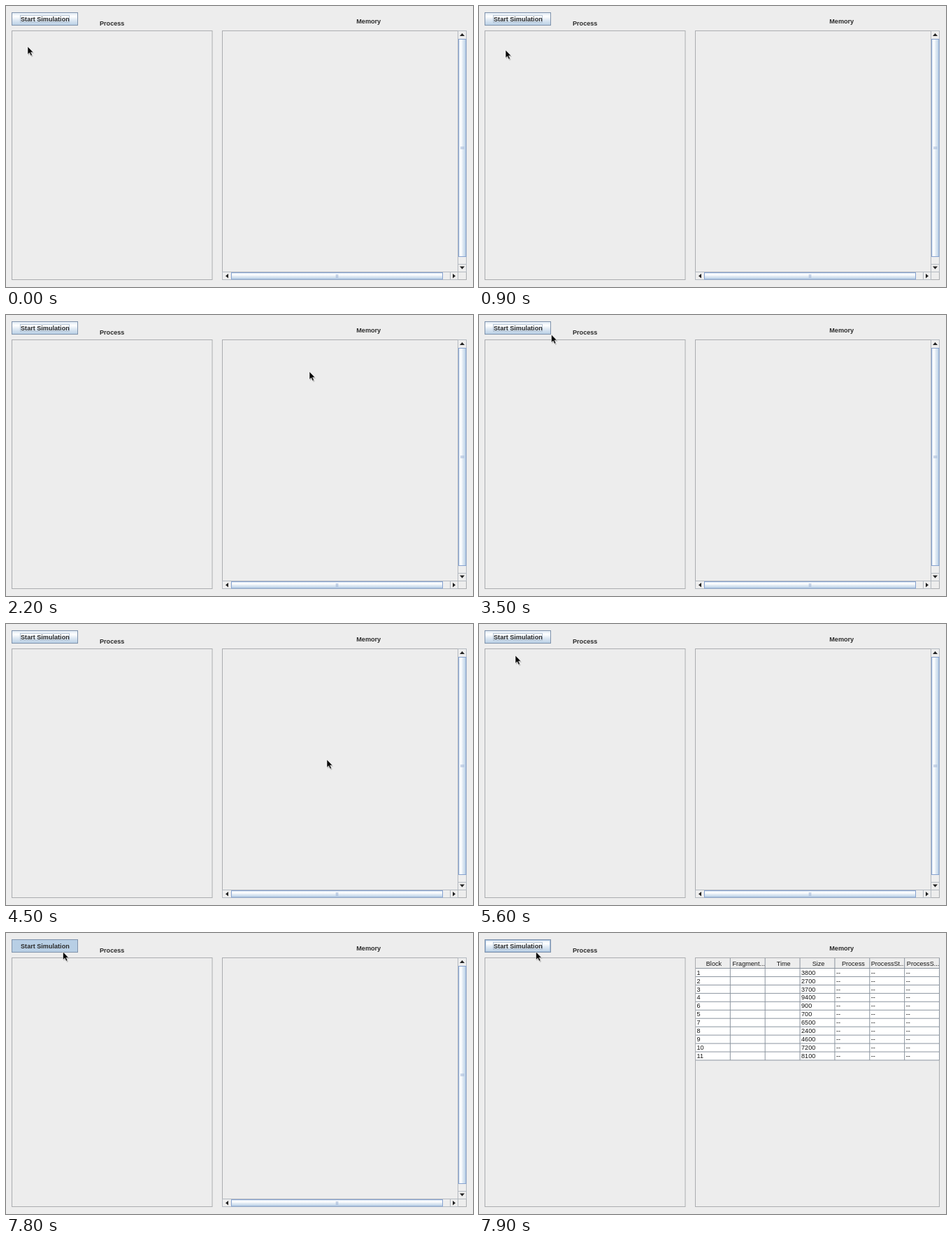
An HTML page for the animation above (8000 ms loop, 668 px wide and 402 px high).

```html
<!DOCTYPE html>
<html lang="en">
<head>
<meta charset="utf-8">
<title>Memory simulation</title>
<style>
  html, body { margin: 0; width: 100%; height: 100%; overflow: hidden; background: #ededed; }
  svg { display: block; }
  text { font: 9.1px "Liberation Sans", Arial, sans-serif; fill: #151515; }
  .bold { font-weight: bold; fill: #2b2b2b; }
  .mid { text-anchor: middle; }
  .panel { fill: none; stroke: #abadb0; }
  .track { fill: #eee; stroke: #b3b9c0; }
  .thumb { stroke: #86a2d0; }
  .grip { stroke: #9fb4d6; }
  .grid { stroke: #8b949f; }
</style>
</head>
<body>
<svg width="668" height="402" viewBox="0 0 668 402">
  <defs>
    <linearGradient id="down" x2="0" y2="1">
      <stop stop-color="#dde8f3"/><stop offset=".3" stop-color="#fff"/>
      <stop offset=".6" stop-color="#dde8f3"/><stop offset="1" stop-color="#b8cfe5"/>
    </linearGradient>
    <linearGradient id="across" href="#down" x2="1" y2="0"/>
  </defs>

  <rect id="button" x="8.5" y="9.5" width="94" height="18" fill="url(#down)" stroke="#7f92ab"/>
  <rect id="hover" x="9.5" y="10.5" width="92" height="16" fill="none" stroke="#a3bddb"/>
  <rect id="focus" x="20.5" y="13.5" width="70" height="10" fill="none" stroke="#a8bace" stroke-width=".8"/>
  <text class="bold mid" x="55.9" y="22.3">Start Simulation</text>
  <text class="bold mid" x="151.7" y="28.4">Process</text>
  <text class="bold mid" x="518.7" y="25.4">Memory</text>

  <rect class="panel" x="8.5" y="35.5" width="286.5" height="356"/>
  <rect class="panel" x="309.5" y="35.5" width="349" height="356"/>

  <g id="bars">
    <rect class="track" x="646.5" y="35.5" width="12" height="345"/>
    <rect class="track" x="309.5" y="380.5" width="337" height="11"/>
    <path class="track" d="M647 369.5h11M635.5 381v10"/>
    <rect class="thumb" x="647.5" y="47.5" width="10.5" height="311" fill="url(#across)"/>
    <rect class="thumb" x="322.5" y="381.5" width="302" height="9.5" fill="url(#down)"/>
    <path class="grip" d="M650 202h5.500m-5.500 2h5.500M472.500 384v5m2-5v5"/>
    <path fill="#222" d="M649 43l3.500-4 3.500 4zM649 372.500l3.500 4 3.500-4zM318 383l-4 3.300 4 3.300zM639 383l4 3.300-4 3.300z"/>
  </g>
  <g id="table"></g>

  <g id="cursor">
    <path d="M1 1.500V13L3.700 10.600 5.600 15 7.700 14 5.800 9.800H9.300Z" opacity=".18"/>
    <path d="M0 0V11.300L2.600 8.900 4.500 13.200 6.500 12.300 4.600 8.200H8Z" fill="#080808" stroke="#fff" stroke-width=".7" stroke-opacity=".8"/>
  </g>
</svg>
<script>
const $ = id => document.getElementById(id);
const show = (id, on) => $(id).setAttribute('visibility', on ? 'visible' : 'hidden');

const LOOP = 8000, TICK = 100, HOVER = 5900, PRESS = 7800, RELEASE = 7900;

// The pointer glides to each stop in a number of equal ticks and rests there.
const home = { x: 31, y: 58 };
const glides = [
  { end: 200, ticks: 1, x: 38, y: 63 },
  { end: 1500, ticks: 3, x: 262, y: 149 },
  { end: 2200, ticks: 3, x: 434, y: 81 },
  { end: 2900, ticks: 1, x: 450, y: 106 },
  { end: 3500, ticks: 3, x: 103.5, y: 28 },
  { end: 3900, ticks: 1, x: 428, y: 175 },
  { end: 4400, ticks: 3, x: 459, y: 194 },
  { end: 4700, ticks: 1, x: 223, y: 116 },
  { end: 5600, ticks: 3, x: 52, y: 45 },
  { end: 6200, ticks: 6, x: 78, y: 27 },
  { end: 6600, ticks: 1, x: 81.5, y: 27 }
];

function pointerAt(t) {
  const now = Math.floor(t / TICK) * TICK;
  let { x, y } = home;
  for (const glide of glides) {
    const part = Math.min(1, 1 + (now - glide.end) / (glide.ticks * TICK));
    if (part <= 0) break;
    x += (glide.x - x) * part;
    y += (glide.y - y) * part;
  }
  return `translate(${x} ${y})`;
}

function buildTable() {
  const heads = 'Block,Fragment...,Time,Size,Process,ProcessSt...,ProcessS...'.split(',');
  const blocks = [1, 2, 3, 4, 6, 5, 7, 8, 9, 10, 11];
  const sizes = [3800, 2700, 3700, 9400, 900, 700, 6500, 2400, 4600, 7200, 8100];
  const left = 309.5, top = 50.5, colW = 349 / 7, rowH = 11.95;
  const bottom = top + blocks.length * rowH;
  const label = (x, y, text, kind = '') => `<text class="${kind}" x="${x}" y="${y}">${text}</text>`;
  let cells = `<rect x="310" y="${top}" width="348" height="${bottom - top}" fill="#fff"/>`;
  let lines = `M310 ${bottom}H658`;

  heads.forEach((head, i) => {
    const x = left + i * colW;
    cells += label(x + colW / 2 + 1.5, 47.2, head, 'mid');
    lines += `M${x + colW} 36V${bottom}`;
  });
  blocks.forEach((block, i) => {
    const y = top + i * rowH;
    [block, '', '', sizes[i], '--', '--', '--'].forEach((text, col) => {
      cells += label(left + col * colW + 2, y + 9.1, text);
    });
    lines += `M310 ${y}H658`;
  });
  $('table').innerHTML = `${cells}<path class="grid" d="${lines}"/>`;
}

function draw() {
  const t = (performance.now() - start) % LOOP;
  const pressed = t >= PRESS && t < RELEASE;
  const done = t >= RELEASE;
  $('cursor').setAttribute('transform', pointerAt(t));
  $('button').setAttribute('fill', pressed ? '#b8cfe5' : 'url(#down)');
  show('hover', t >= HOVER && !pressed);
  show('focus', !pressed);
  show('bars', !done);
  show('table', done);
  requestAnimationFrame(draw);
}

buildTable();
const start = performance.now();
draw();
</script>
</body>
</html>
```
